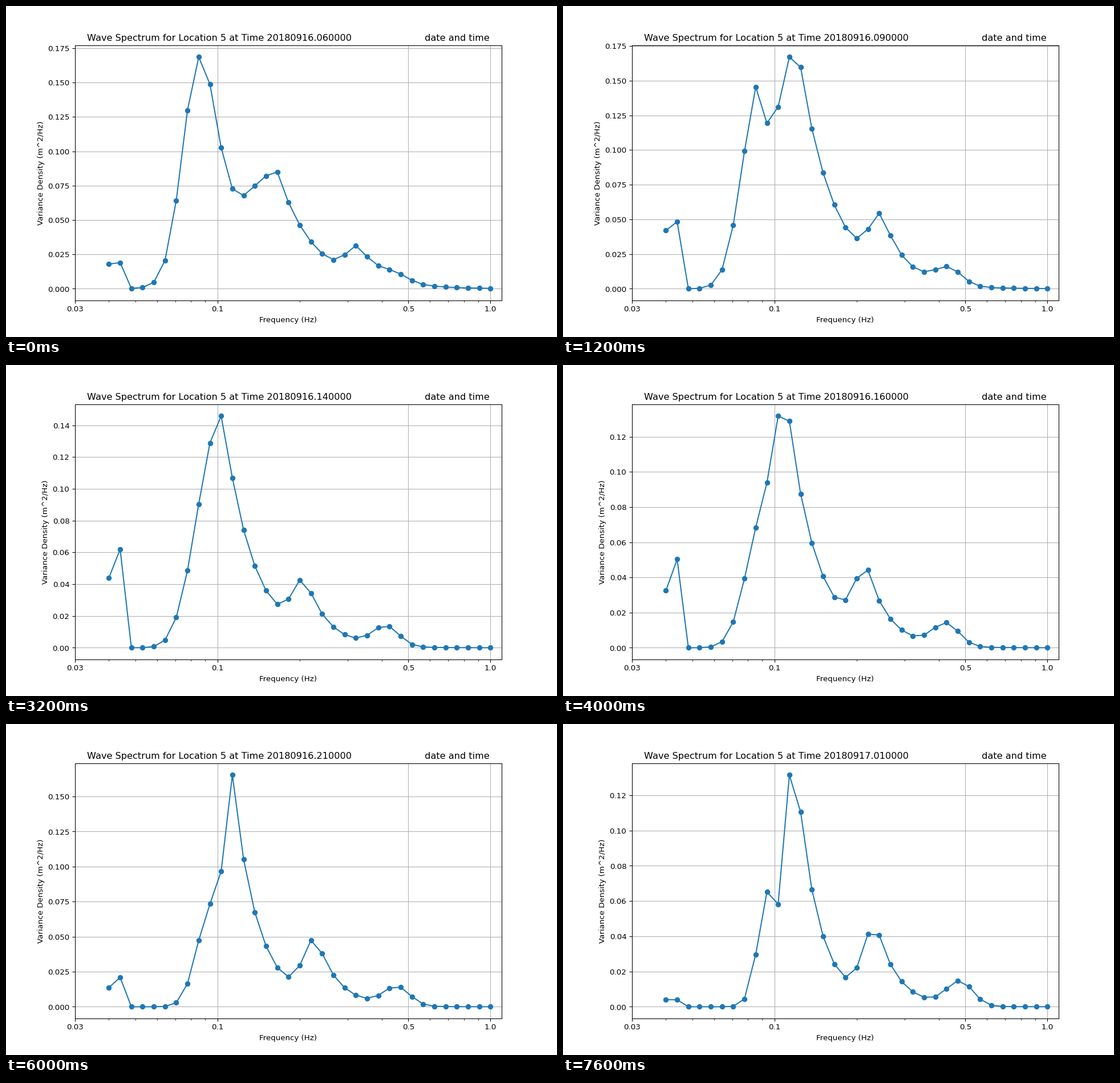
Recreate the animation shown at these times as a matplotlib script. Size 966x580 px, loop 8000 ms.

```python
import matplotlib.pyplot as plt
import numpy as np
from matplotlib.animation import FuncAnimation
from matplotlib.ticker import NullFormatter

WIDTH, HEIGHT, DPI = 966, 580, 96.6
HOURS, INTERVAL = 20, 400
START_HOUR = 6
SLACK = 0.02  # keeps the pixel size from rounding down

plt.rcParams["font.family"] = "DejaVu Sans"

band = np.arange(35)
frequency = np.geomspace(0.04, 1.0, band.size)


def track(hour, *keys):
    """Linear motion through (hour, value) keys."""
    return np.interp(hour, *zip(*keys))


def crest(center, height, rise, fall, power=1):
    """Gaussian flank below the center, exponential decay above it."""
    offset = band - center
    below = np.exp(-(offset / rise) ** 2 / 2)
    above = np.exp(-(np.maximum(offset, 0) / fall) ** power)
    return height * np.where(offset < 0, below, above)


def old_swell(hour):
    center = track(hour, (4, 8), (17, 9.2))
    height = track(hour, (0, 153), (1, 146), (2, 118), (5, 78), (9, 70), (19, 66))
    rise = track(hour, (11, 1.45), (19, 0.95))
    fall = track(hour, (0, 2.2), (2, 1))
    return crest(center, height, rise, fall, power=2)


def main_swell(hour):
    center = track(hour, (0, 15), (2, 12.2), (5, 10.7), (8, 10.2),
                   (12, 11), (16, 11), (19, 11.4))
    height = track(hour, (0, 85), (2, 155), (3, 176), (5, 164), (8, 143),
                   (12, 157), (13, 166), (15, 164), (19, 150))
    rise = 0.7 + 3.1 * np.exp(-hour / 4)
    return crest(center, height, rise, 3.3 - 0.07 * hour)


def wind_sea(hour):
    center = track(hour, (0, 22.3), (2, 19.8), (5, 18.2), (8, 17.5),
                   (12, 18.3), (19, 18.7))
    height = track(hour, (0, 22), (2, 40), (8, 34), (14, 44))
    return crest(center, height, 1.1, 1.9)


def ripples(hour):
    center = track(hour, (0, 25.5), (8, 24.7), (19, 26.2))
    height = track(hour, (0, 5), (3, 12), (19, 14))
    return crest(center, height, 1.2, 1.6, power=2)


def density(hour):
    values = sum(part(hour) for part in (old_swell, main_swell, wind_sea, ripples))
    values[0] = track(hour, (0, 18), (5, 58), (8, 44), (12, 21), (19, 4))
    values[1] = track(hour, (0, 19), (5, 68), (8, 62), (15, 21), (19, 4))
    return values / 1000


def title(hour):
    day, clock = divmod(START_HOUR + hour, 24)
    stamp = f"201809{16 + day}.{clock:02d}0000"
    return f"Wave Spectrum for Location 5 at Time {stamp}" + " " * 25 + "date and time"


fig, ax = plt.subplots(figsize=((WIDTH + SLACK) / DPI, (HEIGHT + SLACK) / DPI), dpi=DPI)
fig.subplots_adjust(left=0.1249, right=0.8998, bottom=0.1107, top=0.8807)
line, = ax.plot(frequency, density(0), marker="o", color="tab:blue")
ax.set_xscale("log")
ax.set_xlim(0.03, 1.1)
ax.set_xticks([0.03, 0.1, 0.5, 1.0], ["0.03", "0.1", "0.5", "1.0"])
ax.xaxis.set_minor_formatter(NullFormatter())
ax.set_xlabel("Frequency (Hz)")
ax.set_ylabel("Variance Density (m^2/Hz)")
ax.grid(True)


def update(hour):
    values = density(hour)
    line.set_ydata(values)
    ax.set_ylim(-0.05 * values.max(), 1.05 * values.max())
    ax.set_title(title(hour))
    return line,


animation = FuncAnimation(fig, update, frames=HOURS, interval=INTERVAL,
                          repeat=True, repeat_delay=0, blit=False)
plt.show()
```
